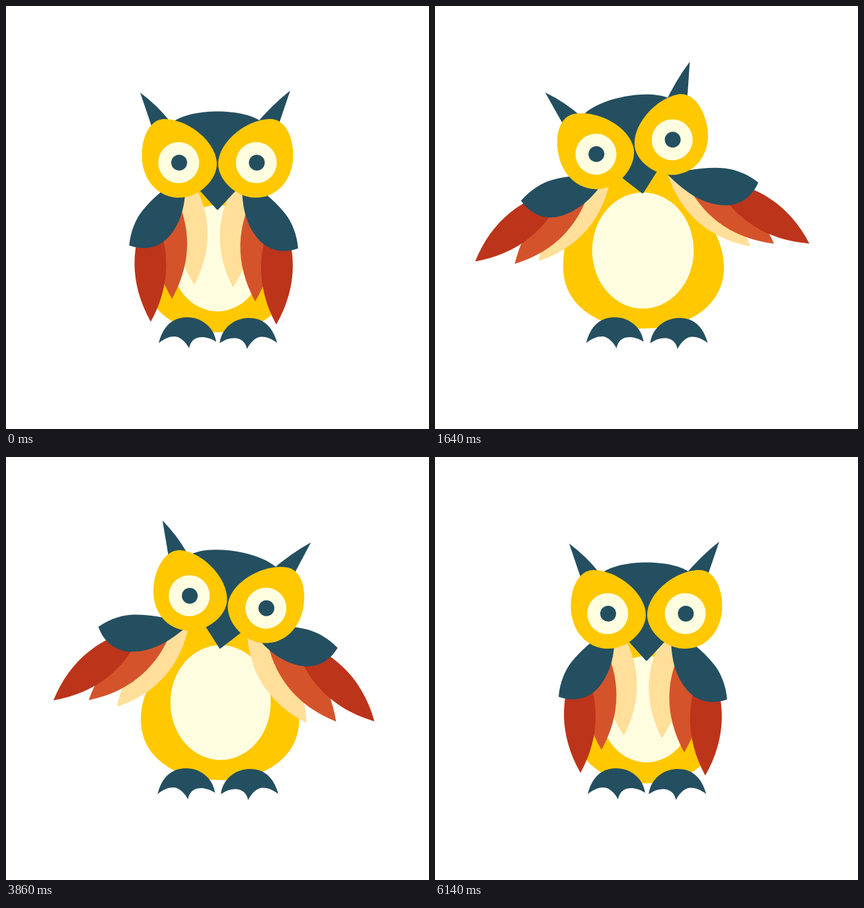
Recreate the animation shown at these times as an HTML page. Size 640 by 640 pixels, loop 6210 ms.

```html
<!DOCTYPE html>
<html lang="en">
<head>
<meta charset="utf-8">
<title>Owl</title>
<style>
  html, body { margin: 0; width: 100%; height: 100%; overflow: hidden; background: #fff; }
  svg { display: block; width: 100vw; height: 100vh; }
  .dark { fill: #244f60; }
  .gold { fill: #ffc800; }
  .pale { fill: #fffde0; }
  .sand { fill: #ffdf9a; }
  .rust { fill: #d4532b; }
  .red { fill: #bc341a; }
</style>
</head>
<body>
<svg viewBox="0 0 640 640">
  <defs>
    <path id="foot" d="M231 510C238 482 254 471 274 471C297 471 315 487 318 508C310 503 303 501 297 501C286 501 279 507 277 518C272 508 263 500 255 500C247 500 240 503 231 510Z"/>
    <g id="eye">
      <path class="gold" d="M319 239C319 262 293 290 262 290C229 290 205.500 262 205.500 226C205.500 197 218 171 240 171C276 171 319 206 319 239Z"/>
      <circle class="pale" cx="261.300" cy="237" r="31"/>
    </g>
  </defs>
  <path id="body" class="gold"/>
  <ellipse id="belly" class="pale"/>
  <g class="dark">
    <use id="footL" href="#foot"/>
    <use id="footR" href="#foot"/>
  </g>
  <g id="wings"></g>
  <g id="head">
    <g class="dark">
      <path d="M203 131Q230 151 250 177L223 190Z"/>
      <path id="earR" d="M430 128Q403 149 376 181L411 184Z"/>
      <path d="M250 178C275 153.300 365 153.300 390 178L348 279L321.500 307.500Q320 309.500 318.500 307.500L293 279Z"/>
    </g>
    <use href="#eye"/>
    <use href="#eye" transform="matrix(-1 0 0 1 640 0)"/>
    <g class="dark">
      <circle cx="262" cy="237" r="12"/>
      <circle cx="379.500" cy="237" r="12"/>
    </g>
  </g>
</svg>
<script>
const LOOP = 6210, STEPS = 87, STEP = LOOP / STEPS, SECOND = 3028;
const $ = id => document.getElementById(id);
const leaf = (len, h) =>
  `M0 0C${len * .33} ${h} ${len * .67} ${h} ${len} 0C${len * .67} ${-h} ${len * .33} ${-h} 0 0Z`;
const covert = 'M0 0C25 20 50 38 84 39C110 40 130 25 138 0C120 -12 100 -17 85 -17C55 -17 25 -8 0 0Z';

// Sine rise, then sine fall
const sine = u => (1 - Math.cos(Math.PI * u)) / 2;
function pulse(t, peak, end, warp = 1) {
  if (t <= 0 || t >= end) return 0;
  return t < peak ? sine(t / peak) : 1 - sine(((t - peak) / (end - peak)) ** warp);
}
const sway = t => pulse(t, 1290, 2580);
const lift = t => pulse(t, 1220, 2440);

// Right wing: root x, root y, angle at rest, raised high, raised low
const feathers = [
  { tone: 'sand', d: leaf(166, 32), turn: t => pulse(t, 1380, 3070, .67),
    rest: [352, 260, 93], high: [352, 253, 31], low: [369, 264, 35] },
  { tone: 'rust', d: leaf(170, 32), turn: t => pulse(t, 1380, 3000, .6),
    rest: [380, 277, 91], high: [375, 253, 21], low: [398, 264, 27] },
  { tone: 'red', d: leaf(175, 32), turn: sway,
    rest: [411, 307, 90.7], high: [423, 250, 23.5], low: [443, 264, 24] },
  { tone: 'dark', d: covert, turn: lift,
    rest: [357, 258, 52], high: [350, 254, -9.3], low: [371, 258, -1.5] }
];
const sides = [{ left: true, lead: 55 }, { left: false, lead: -30 }];

function addPath(parent, tone, d) {
  const p = document.createElementNS('http://www.w3.org/2000/svg', 'path');
  p.setAttribute('class', tone);
  p.setAttribute('d', d);
  return parent.appendChild(p);
}
for (const side of sides) side.paths = feathers.map(f => addPath($('wings'), f.tone, f.d));

function set(el, attrs) {
  for (const k in attrs) el.setAttribute(k, attrs[k]);
}

// Roots ride on the covert; each feather turns at its own pace
function drawWing(side, t) {
  const a = t + side.lead, b = a - SECOND;
  const flip = side.left ? `matrix(-1 0 0 1 629 ${-4 + 3 * (lift(a) + lift(b))}) ` : '';
  feathers.forEach((f, i) => {
    const [first, second] = side.left ? [f.low, f.high] : [f.high, f.low];
    const [x, y, r] = f.rest.map((v, k) => {
      const move = k < 2 ? lift : f.turn;
      return v + move(a) * (first[k] - v) + move(b) * (second[k] - v);
    });
    set(side.paths[i], { transform: `${flip}translate(${x} ${y}) rotate(${r})` });
  });
}

function drawBody(w, dir, hx, hy) {
  const cx = 320 + dir * 5.3 * w, hw = 108 + 16.5 * w;
  const my = 410 - 18 * w, by = 493.7 - 7 * w;
  const low = my + .62 * (by - my), top = hy + 10;
  const l = cx - hw, r = cx + hw;
  set($('body'), {
    d: `M${l} ${my}C${l} ${low} ${cx - .57 * hw} ${by} ${cx} ${by}` +
       `C${cx + .57 * hw} ${by} ${r} ${low} ${r} ${my}` +
       `C${r} ${my - 60} ${hx + 76} ${top + 55} ${hx + 45} ${top}` +
       `L${hx - 45} ${top}C${hx - 76} ${top + 55} ${l} ${my - 60} ${l} ${my}Z`
  });
  set($('belly'), {
    cx: 320 + dir * 6.5 * w, cy: 381.5 - 14 * w, rx: 70 + 8.3 * w, ry: 80.5 + 9 * w
  });
}

function draw(t) {
  const dir = t < SECOND ? -1 : 1;
  const w = sway(dir < 0 ? t : t - SECOND);
  const hx = 320 + dir * 24.5 * w ** 1.4;
  const hy = 237 - (dir < 0 ? 30 : 27) * w ** 1.25;
  const spread = 3.4 * w * w;
  drawBody(w, dir, hx, hy);
  set($('head'), { transform: `translate(${hx} ${hy}) rotate(${dir * 12.9 * w}) translate(-320 -237)` });
  set($('earR'), { transform: `rotate(${dir < 0 ? -5 * w : 0} 398 172)` });
  set($('footL'), { transform: `translate(${-spread} 0)` });
  set($('footR'), { transform: `translate(${spread} 1) rotate(-1.5 366 495) matrix(-1 0 0 1 641 0)` });
  for (const side of sides) drawWing(side, t);
}

const start = performance.now();
function tick() {
  const t = (performance.now() - start) % LOOP;
  draw(Math.floor((t + 5) / STEP) % STEPS * STEP);
  requestAnimationFrame(tick);
}
tick();
</script>
</body>
</html>
```
